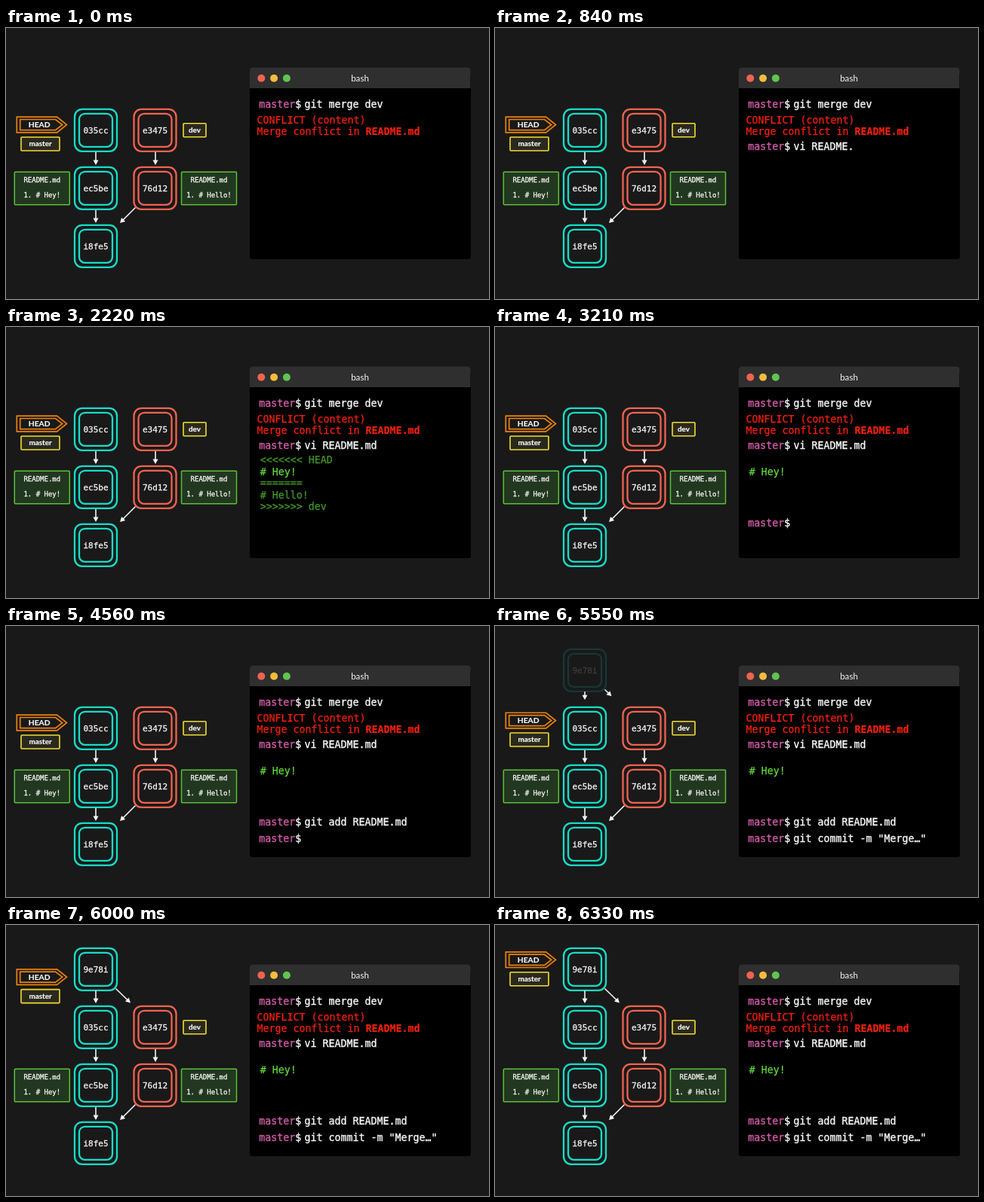
An HTML page for the animation above (8.97 s loop, 640x360 px).

```html
<!DOCTYPE html>
<html lang="en">
<head>
<meta charset="utf-8">
<title>Resolving a merge conflict</title>
<style>
html, body { margin: 0; width: 100%; height: 100%; overflow: hidden; background: #191919; }
svg { display: block; width: 100vw; height: 100vh; }
text { fill: #f4f4f4; stroke: #f4f4f4; stroke-width: 0; }
.mono { font-family: "DejaVu Sans Mono", monospace; stroke-width: .3px; }
.sans { font-family: Lato, sans-serif; }
.term { font-size: 13.3px; stroke-width: .4px; }
.mid { text-anchor: middle; }
.bold { font-weight: bold; stroke-width: .2px; }
.red { fill: #f5200a; stroke: #f5200a; stroke-width: .25px; }
.green { fill: #62d63c; stroke: #62d63c; stroke-width: .25px; }
.pink { fill: #cb5ba3; stroke: #cb5ba3; }
</style>
</head>
<body>
<svg id="stage" viewBox="0 0 640 360">
  <rect width="640" height="360" fill="#191919"/>
</svg>
<script>
const LOOP = 8970;
const TEAL = '#18dcc8', RED = '#f0634f', ORANGE = '#ea820e', YELLOW = '#f2dc35', LIME = '#5cc03c';
const stage = document.getElementById('stage');

function el(tag, attrs, parent = stage, text = '') {
  const e = document.createElementNS('http://www.w3.org/2000/svg', tag);
  for (const k in attrs) e.setAttribute(k, attrs[k]);
  if (text) e.textContent = text;
  parent.appendChild(e);
  return e;
}
const group = () => el('g', {});

function box(cx, cy, w, h, r, stroke, width, fill, parent) {
  el('rect', { x: cx - w / 2, y: cy - h / 2, width: w, height: h, rx: r,
    stroke, 'stroke-width': width, fill }, parent);
}

function label(x, y, size, cls, text, parent) {
  return el('text', { x, y, 'font-size': size, class: cls }, parent, text);
}

function commit(cx, cy, color, id, parent) {
  box(cx, cy, 56, 56, 10, color, 2.3, 'none', parent);
  box(cx, cy, 44, 44, 7.5, color, 2.3, 'none', parent);
  label(cx, cy + 4, 11, 'mono mid', id, parent);
}

// Returns a setter for the visible length of the arrow.
function arrow(x1, y1, x2, y2, parent) {
  const full = Math.hypot(x2 - x1, y2 - y1);
  const turn = Math.atan2(y2 - y1, x2 - x1) * 180 / Math.PI;
  const g = el('g', { transform: `translate(${x1} ${y1}) rotate(${turn})` }, parent);
  const line = el('path', { stroke: '#f4f4f4', 'stroke-width': 1.6 }, g);
  const head = el('path', { fill: '#f4f4f4' }, g);
  const set = p => {
    const len = 10 + (full - 10) * p;
    line.setAttribute('d', `M0 0H${len - 5}`);
    head.setAttribute('d', `M${len} 0l-6.5 -3.5v7z`);
  };
  set(1);
  return set;
}

function tag(cx, cy, w, text, parent) {
  box(cx, cy, w, 18, 1, YELLOW, 1.6, '#2a291d', parent);
  label(cx, cy + 3, 9.9, 'sans mid bold', text, parent);
}

function fileCard(cx, line) {
  box(cx, 212.9, 73, 43.5, 1, LIME, 1.5, '#22371f');
  label(cx, 205.2, 9, 'mono mid', 'README.md');
  label(cx, 224.7, 9, 'mono mid', line);
}

function prompt(y, parent) {
  const t = el('text', { x: 335.2, y, class: 'mono term' }, parent);
  el('tspan', { class: 'pink' }, t, 'master');
  el('tspan', {}, t, '$');
}

const termText = (x, y, cls, text, parent) =>
  el('text', { x, y, class: 'mono term ' + cls }, parent, text);

// Commit graph
arrow(119, 165, 119, 182);
arrow(119, 242, 119, 259);
arrow(198, 165, 198, 182);
arrow(171.5, 238.5, 151, 259);
const merged = group();
const grow = [[119, 87.3, 119, 104], [145.5, 84.5, 165, 103.5]].map(ends => {
  const g = group();
  const set = arrow(...ends, g);
  return p => { g.setAttribute('visibility', p > 0 ? 'visible' : 'hidden'); set(p); };
});
commit(119, 135.8, TEAL, '035cc');
commit(119, 212.8, TEAL, 'ec5be');
commit(119, 289.8, TEAL, 'i8fe5');
commit(197.5, 135.8, RED, 'e3475');
commit(197.5, 212.8, RED, '76d12');
commit(119, 58.8, TEAL, '9e78i', merged);
fileCard(47.8, '1. # Hey!');
fileCard(269, '1. # Hello!');
tag(250, 135.8, 30, 'dev');

const head = group();
const flag = { stroke: ORANGE, 'stroke-width': 1.7, fill: 'none' };
el('path', { ...flag, d: 'M14.3 118.2H67.5L80.5 128.5L67.5 138.8H14.3z' }, head);
el('path', { ...flag, d: 'M18.7 121.5H65.5L74.7 128.5L65.5 135.6H18.7z' }, head);
label(44.2, 132.3, 10.3, 'sans mid bold', 'HEAD', head);
tag(45.5, 154, 51, 'master', head);

// Terminal window
el('rect', { x: 323, y: 60, width: 293, height: 247, rx: 3, fill: '#000' });
el('path', { d: 'M323 80V57q0 -4.5 4.5 -4.5H611q4.5 0 4.5 4.5V80z', fill: '#2f2f2f' });
['#f0634f', '#f4bd3e', '#60c550'].forEach((fill, i) =>
  el('circle', { cx: 338.3 + 16.8 * i, cy: 66.8, r: 5, fill }));
label(469, 70.6, 11.6, 'sans mid', 'bash');

prompt(106.4);
termText(395.4, 106.4, '', 'git merge dev');
termText(332.4, 126.5, 'red', 'CONFLICT (content)');
const warn = termText(332.4, 142, 'red', 'Merge conflict in ');
el('tspan', { class: 'bold' }, warn, 'README.md');

const markers = group(), kept = group();
['<<<<<<< HEAD', '# Hey!', '=======', '# Hello!', '>>>>>>> dev'].forEach((s, i) =>
  termText(336.8, 181.3 + 15.5 * i, 'green', s, i === 1 ? kept : markers));

const TYPING = 870;
const commands = [
  [60, 161.5, 'vi README.md'],
  [3210, 264.8, 'git add README.md'],
  [4560, 286.8, 'git commit -m "Merge…"']
].map(([start, y, text]) => {
  const g = group();
  prompt(y, g);
  return { start, text, g, out: termText(395.4, y, '', '', g) };
});

const ramp = (t, a, b) => Math.min(1, Math.max(0, (t - a) / (b - a)));

// Cubic ease-in-out with handles at .42 and .58
function ease(x) {
  let lo = 0, hi = 1;
  for (let i = 0; i < 20; i++) {
    const s = (lo + hi) / 2, r = 1 - s;
    if (3 * s * r * (r * 0.42 + s * 0.58) + s * s * s < x) lo = s; else hi = s;
  }
  return x <= 0 ? 0 : x >= 1 ? 1 : lo * lo * (3 - 2 * lo);
}

function draw(t) {
  for (const c of commands) {
    const n = Math.floor(ramp(t, c.start, c.start + TYPING) * c.text.length + 1e-6);
    c.g.setAttribute('visibility', t >= c.start ? 'visible' : 'hidden');
    c.out.textContent = c.text.slice(0, n);
  }
  const shown = ease(ramp(t, 1020, 1800));
  kept.setAttribute('opacity', shown);
  markers.setAttribute('opacity', shown * (1 - ease(ramp(t, 1950, 2670))));

  const p = ease(ramp(t, 5430, 5880));
  merged.setAttribute('opacity', p);
  grow.forEach(set => set(p));
  head.setAttribute('transform', `translate(0 ${-82.3 * ease(ramp(t, 5430, 6330))})`);
}

const begin = performance.now();
function tick() {
  draw((performance.now() - begin) % LOOP);
  requestAnimationFrame(tick);
}
tick();
</script>
</body>
</html>
```
